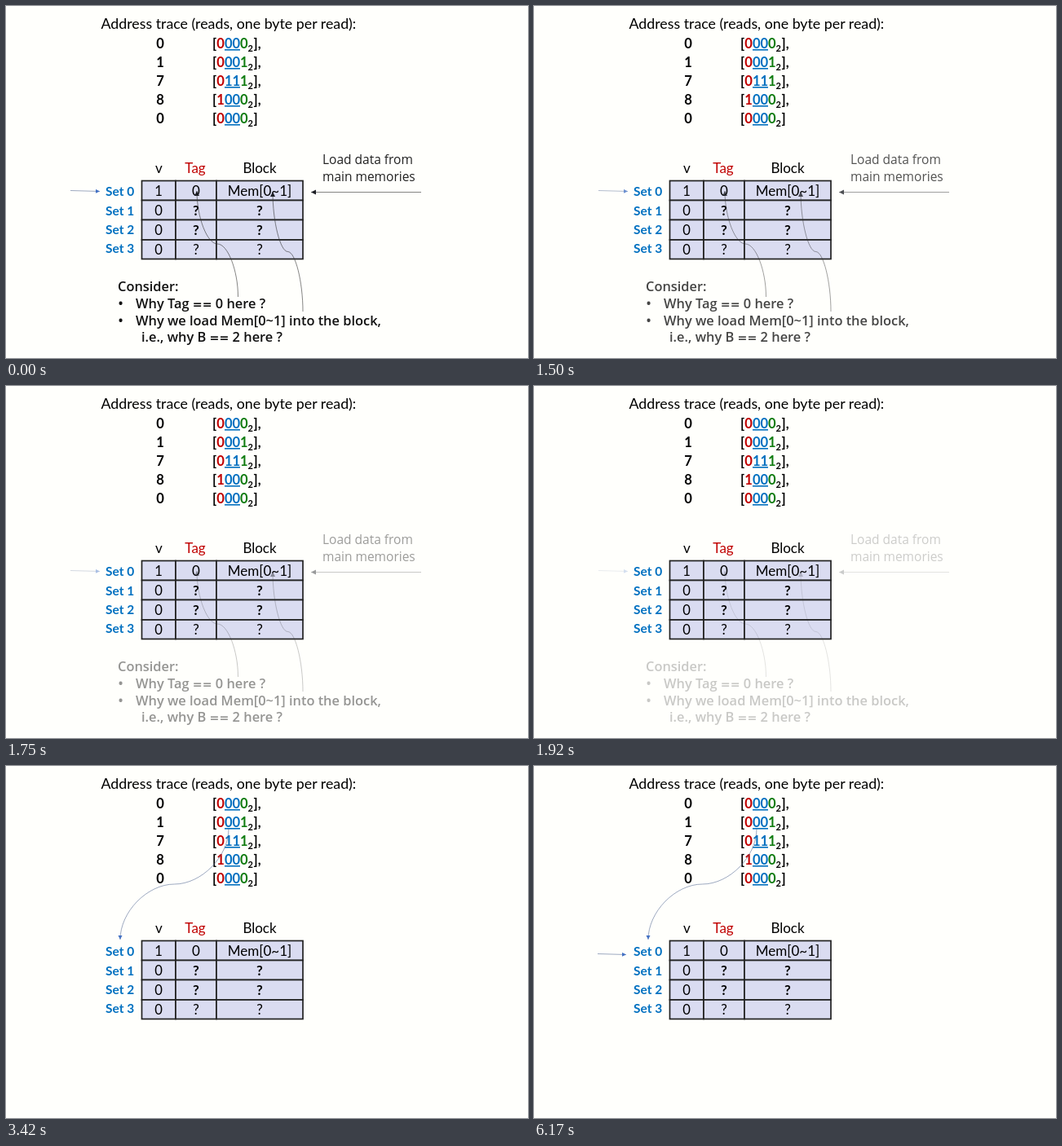
Animation of 640x432 px, one loop 8 s. Source, as an HTML page:

```html
<!DOCTYPE html>
<html lang="en">
<head>
<meta charset="utf-8">
<title>Cache address trace</title>
<style>
  html, body { margin: 0; width: 100%; height: 100%; overflow: hidden; background: #fffffc; }
  svg { display: block; width: 640px; height: 432px; font: 16.6px Lato, sans-serif; }
  .bold { font-weight: 700; }
  .mid { text-anchor: middle; }
  .head { font-size: 17px; }
  .set { font-size: 15.5px; }
  .sub { font-size: 11px; }
  .red { fill: #c00000; }
  .blue { fill: #0070c0; }
  .green { fill: #107c10; }
  .load { font: 15.5px "Open Sans", sans-serif; fill: #222; }
  .ask { font: 600 16.4px "Open Sans", sans-serif; fill: #111; }
  .equals { font: 700 14.2px "DejaVu Sans", sans-serif; }
  .wire { fill: none; stroke: #333; stroke-width: .6; }
  .link { stroke: #5b6f98; }
</style>
</head>
<body>
<svg id="stage" viewBox="0 0 640 432">
  <defs>
    <marker id="dark" markerUnits="userSpaceOnUse" markerWidth="8" markerHeight="8" refX="6" refY="3" orient="auto">
      <path d="M0 0L6 3L0 6Z" fill="#1c1e24"/>
    </marker>
    <marker id="soft" markerUnits="userSpaceOnUse" markerWidth="8" markerHeight="8" refX="5" refY="2.5" orient="auto">
      <path d="M0 0L5 2.5L0 5Z" fill="#4472c4"/>
    </marker>
  </defs>
  <g id="base"></g>
  <g id="notes"></g>
  <g id="link"></g>
  <g id="pointer"></g>
</svg>
<script>
const LOOP = 8000, FPS = 12;
const layer = id => document.getElementById(id);
const add = (id, markup) => layer(id).insertAdjacentHTML("beforeend", markup);
const text = (id, x, y, cls, content) =>
  add(id, `<text x="${x}" y="${y}" class="${cls}">${content}</text>`);
const arrow = (id, d, cls, head) =>
  add(id, `<path d="${d}" class="wire ${cls}" marker-end="url(#${head})"/>`);

// S-shaped connector that leaves and arrives vertically
function connector(id, x1, y1, x2, y2, cls, head) {
  const mx = (x1 + x2) / 2, my = (y1 + y2) / 2;
  arrow(id, `M${x1} ${y1}C${x1} ${(y1 + my) / 2} ${(x1 + mx) / 2} ${my} ${mx} ${my}` +
    `S${x2} ${(my + y2) / 2} ${x2} ${y2}`, cls, head);
}

// Address trace
add("base", '<text x="116.5" y="28" style="font-size:17.8px">Address trace (reads, one byte per read):</text>');
[[0, "0000"], [1, "0001"], [7, "0111"], [8, "1000"], [0, "0000"]].forEach(([address, bits], i) => {
  const y = 52 + 23 * i;
  text("base", 189, y, "bold mid", address);
  text("base", 253, y, "bold", `[<tspan x="258.3" class="red">${bits[0]}</tspan>` +
    `<tspan x="268" class="blue">${bits.slice(1, 3)}</tspan>` +
    `<tspan x="287" class="green">${bits[3]}</tspan>` +
    `<tspan x="296.5" y="${y + 4}" class="sub">2</tspan>` +
    `<tspan x="303.5" y="${y}">]${i < 4 ? "," : ""}</tspan>`);
  add("base", `<path d="M268 ${y + 1.8}H287" stroke="#0070c0" stroke-width="1.6"/>`);
});

// Cache table
const columns = [166.5, 208, 258, 364], rows = [214.5, 238.5, 262.5, 287, 310.5];
text("base", 187.5, 205, "head mid", "v");
text("base", 232, 205, "head mid red", "Tag");
text("base", 311, 205, "head mid", "Block");
for (let r = 0; r < 4; r++) {
  for (let c = 0; c < 3; c++) {
    add("base", `<rect x="${columns[c]}" y="${rows[r]}" width="${columns[c + 1] - columns[c]}" ` +
      `height="${rows[r + 1] - rows[r]}" fill="#dadcf1" stroke="#222" stroke-width="1.7"/>`);
  }
  const y = 232.6 + 24 * r;
  text("base", 122, 233.4 + 23.1 * r, "bold set blue", "Set " + r);
  text("base", 187, y, "mid", r ? 0 : 1);
  const weight = r === 1 || r === 2 ? "bold" : "";
  text("base", 233, y, `head mid ${weight}`, r ? "?" : 0);
  text("base", 311, y, `head mid ${weight}`, r ? "?" : "Mem[0~1]");
}

// Explanatory notes
const equals = '<tspan class="equals">==</tspan>';
text("notes", 388, 194, "load", "Load data from");
text("notes", 388, 214.5, "load", "main memories");
text("notes", 137, 350, "ask", "Consider:");
text("notes", 137.5, 371, "ask", "•");
text("notes", 159, 371, "ask", `Why Tag ${equals} 0 here ?`);
text("notes", 137.5, 391.5, "ask", "•");
text("notes", 159, 391.5, "ask", "Why we load Mem[0~1] into the block,");
text("notes", 166, 411.5, "ask", `i.e., why B ${equals} 2 here ?`);
arrow("notes", "M509 228.5H374", "", "dark");
arrow("notes", "M79 226.5L115 227.5", "link", "soft");
connector("notes", 284.5, 357, 234, 227, "", "dark");
connector("notes", 364, 375, 327, 228, "", "dark");

// Second access
connector("link", 273, 77, 140, 213, "link", "soft");
arrow("pointer", "M78 230.5L113 231.5", "link", "soft");

const ramp = (tick, from, steps) => Math.min(1, Math.max(0, (tick - from) / steps));

function draw(now) {
  const tick = Math.floor((now % LOOP) * FPS / 1000);
  layer("notes").setAttribute("opacity", 1 - ramp(tick, 16, 9));
  layer("link").setAttribute("opacity", ramp(tick, 34, 7));
  layer("pointer").setAttribute("opacity", ramp(tick, 65, 9));
  requestAnimationFrame(draw);
}
draw(0);
</script>
</body>
</html>
```
